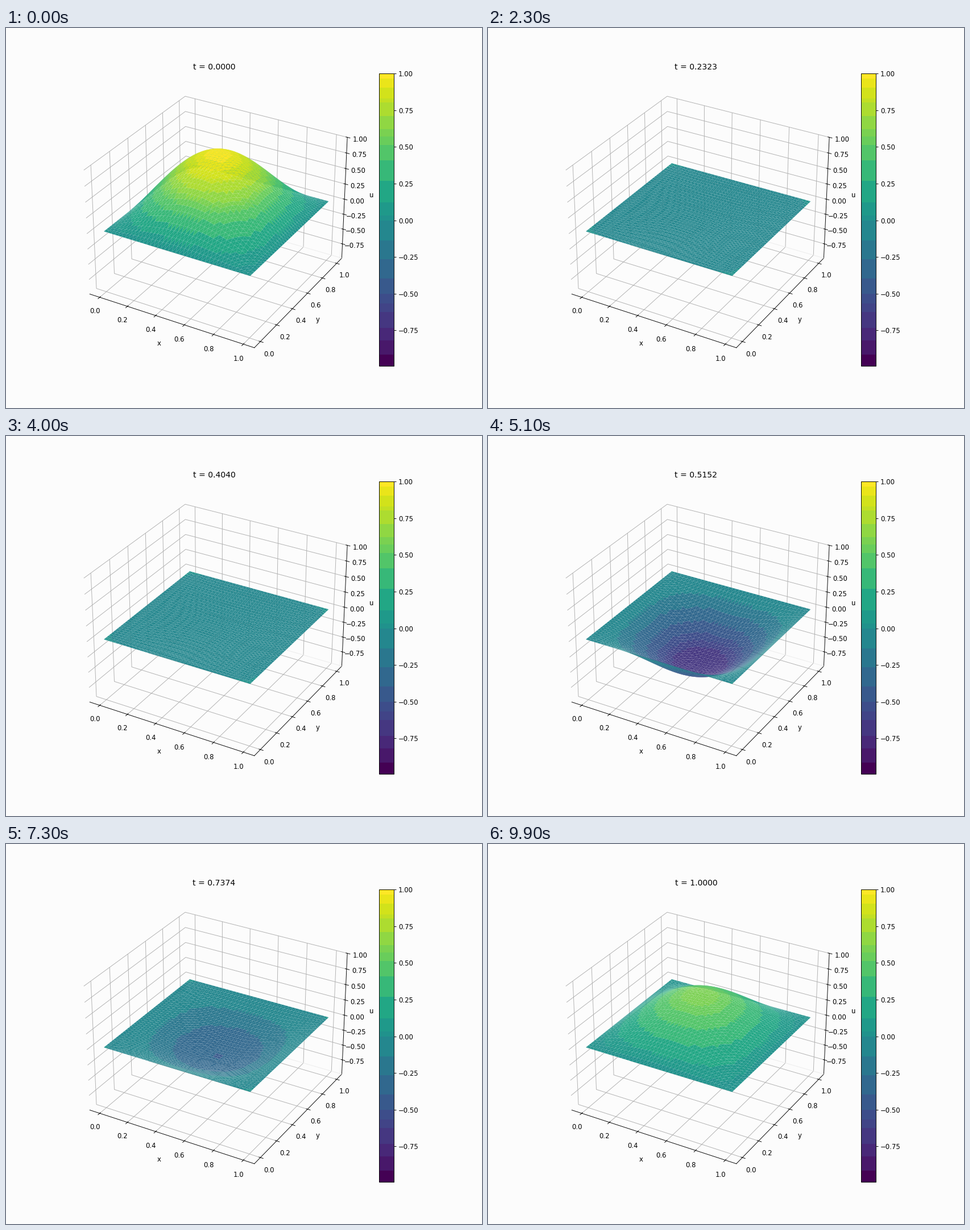
Write a matplotlib script that moves like this. It is 837x669 px and loops after 10 s.

```python
import numpy as np
import matplotlib.pyplot as plt
from matplotlib.animation import FuncAnimation
from matplotlib.colors import ListedColormap, Normalize
from matplotlib.tri import Triangulation

FRAMES = 100
N = 40  # cells per side of the unit square
PAPER = "#fcfcfc"


def amplitude(t):
    """Fundamental bending mode of a square plate, lightly damped."""
    return np.exp(-0.03 * t) * np.cos(2 * np.pi**2 * t)


def banded_viridis():
    """Viridis reduced to a few uneven flat bands."""
    edges = np.array([0, 20, 45, 68, 96, 111, 128, 155, 189, 222, 257, 266, 289,
                      327, 363, 390, 405, 418, 441, 465, 472, 491, 507, 516]) / 516
    mids = (edges[:-1] + edges[1:]) / 2
    mids[0], mids[-1] = 0, 1
    pos = (np.arange(516) + 0.5) / 516
    band = np.searchsorted(edges, pos) - 1
    return ListedColormap(plt.get_cmap("viridis")(mids[band]))


# Regular mesh, each cell split along its rising diagonal
grid = np.linspace(0, 1, N + 1)
x, y = (a.ravel() for a in np.meshgrid(grid, grid))
corner = (np.arange(N)[:, None] * (N + 1) + np.arange(N)).ravel()
lower = np.column_stack([corner, corner + 1, corner + N + 2])
upper = np.column_stack([corner, corner + N + 2, corner + N + 1])
cells = np.stack([lower, upper], axis=1).reshape(-1, 3)
mode = np.sin(np.pi * x) * np.sin(np.pi * y)

times = np.linspace(0, 1, FRAMES)
amps = amplitude(times)
zmin, zmax = amps.min(), 1.0

fig = plt.figure(figsize=(10, 7.9929), dpi=83.7, facecolor=PAPER)
ax = fig.add_subplot(projection="3d", facecolor=PAPER)
surf = ax.plot_trisurf(Triangulation(x, y, cells), mode, cmap=banded_viridis(),
                       norm=Normalize(zmin, zmax))
fig.colorbar(surf, ax=ax)

lo, hi = -0.0729, 1.0729
ax.set_xlim(lo, hi)
ax.set_ylim(lo, hi)
ax.set_zlim(zmin, zmax)
ax.set_xlabel("x")
ax.set_ylabel("y")
ax.set_zlabel("u")
for axis in (ax.xaxis, ax.yaxis, ax.zaxis):
    axis.set_pane_color((0.988, 0.988, 0.988, 1))
ax.plot([lo, hi], [hi, hi], [zmin, zmin], color="#ececec", lw=0.8)
title = ax.set_title("")


def update(i):
    u = amps[i] * mode
    points = np.column_stack([x, y, u])
    surf.set_verts(points[cells])
    surf.set_array(u[cells].mean(axis=1))
    title.set_text(f"t = {times[i]:.4f}")
    return surf, title


anim = FuncAnimation(fig, update, frames=FRAMES, interval=100,
                     repeat=True, repeat_delay=0, blit=False)
plt.show()
```
